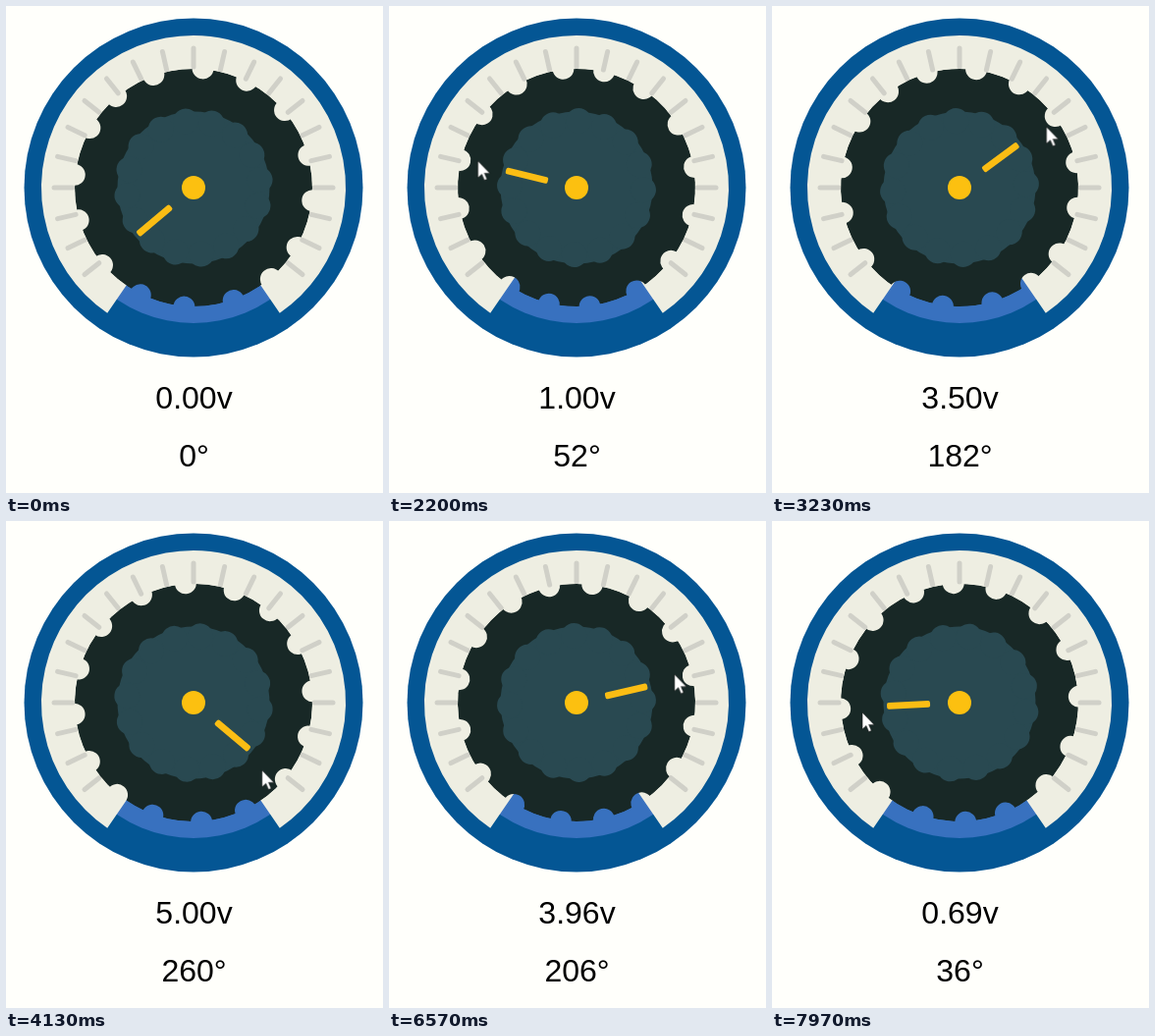
Animation, 384 px wide and 496 px high, one loop 8000 ms. Source, as an HTML page without scripts:

```html
<!DOCTYPE html>
<html lang="en">
<head>
<meta charset="utf-8">
<title>Potentiometer dial</title>
<style>
@property --turn { syntax: "<number>"; inherits: true; initial-value: 0; }
@property --deg { syntax: "<integer>"; inherits: true; initial-value: 0; }
@property --cents { syntax: "<integer>"; inherits: true; initial-value: 0; }
@property --volts { syntax: "<integer>"; inherits: true; initial-value: 0; }

html, body {
  margin: 0;
  width: 384px;
  height: 496px;
  overflow: hidden;
  background: #fffffb;
}
body {
  position: relative;
  animation: turn 8s linear infinite;
  /* the readout trails the knob slightly between its end stops */
  --deg: calc(var(--turn) - min(1.5, var(--turn) * .1, (260 - var(--turn)) * .1));
  --cents: calc(var(--deg) * 100 / 52);
  --volts: calc(var(--cents) / 100 - .495);
}
svg { display: block; }

.knob { transform: rotate(calc(var(--turn) * 1deg)); }
.cursor { animation: drag 8s linear infinite, appear 8s step-end infinite; }

p {
  position: absolute;
  left: 0;
  width: 383px;
  margin: 0;
  text-align: center;
  font: 32px/32px "Liberation Sans", Arial, sans-serif;
  color: #000;
}
.volts { top: 383px; counter-reset: v var(--volts) c calc(var(--cents) - 100 * var(--volts)); }
.volts::before { content: counter(v) "." counter(c, decimal-leading-zero); }
.angle { top: 442px; counter-reset: d var(--deg); }
.angle::before { content: counter(d); }

@keyframes turn {
  0%, 16.6% { --turn: 0; }
  18.75% { --turn: 4; }
  21.25% { --turn: 14; }
  24.4% { --turn: 31; }
  27.5% { --turn: 53.5; }
  33.75% { --turn: 117; }
  40.38% { --turn: 183.5; }
  45.6% { --turn: 230; }
  50.6%, 76.6% { --turn: 260; }
  80% { --turn: 235; }
  83.75% { --turn: 186; }
  89.13% { --turn: 115.4; }
  94.38% { --turn: 74; }
  99.6% { --turn: 37.5; }
  100% { --turn: 36; }
}
@keyframes drag {
  0%, 9.63% { transform: rotate(-126.4deg) translateY(-104px) rotate(126.4deg); }
  10%, 16.6% { transform: rotate(-128deg) translateY(-104px) rotate(128deg); }
  18.75% { transform: rotate(-124.5deg) translateY(-104px) rotate(124.5deg); }
  21.25% { transform: rotate(-114.5deg) translateY(-104px) rotate(114.5deg); }
  24.4% { transform: rotate(-97.5deg) translateY(-104px) rotate(97.5deg); }
  27.5% { transform: rotate(-75deg) translateY(-104px) rotate(75deg); }
  33.75% { transform: rotate(-11.5deg) translateY(-106px) rotate(11.5deg); }
  40.38% { transform: rotate(55deg) translateY(-108px) rotate(-55deg); }
  45.6% { transform: rotate(101.5deg) translateY(-102px) rotate(-101.5deg); }
  51.63% { transform: rotate(134.6deg) translateY(-98px) rotate(-134.6deg); }
  53.75%, 55.5% { transform: rotate(137deg) translateY(-100px) rotate(-137deg); }
  59.63%, 64.6% { transform: rotate(111.7deg) translateY(-100px) rotate(-111.7deg); }
  69.63%, 71.25% { transform: rotate(130deg) translateY(-98px) rotate(-130deg); }
  72.1%, 76.6% { transform: rotate(128.7deg) translateY(-97.5px) rotate(-128.7deg); }
  80% { transform: rotate(102deg) translateY(-101px) rotate(-102deg); }
  83.75% { transform: rotate(52.7deg) translateY(-106px) rotate(-52.7deg); }
  89.13% { transform: rotate(-18deg) translateY(-112.6px) rotate(18deg); }
  94.38% { transform: rotate(-59.4deg) translateY(-106px) rotate(59.4deg); }
  99.6%, 100% { transform: rotate(-95.8deg) translateY(-99.5px) rotate(95.8deg); }
}
@keyframes appear {
  0% { visibility: hidden; }
  9.62%, 100% { visibility: visible; }
}
</style>
</head>
<body>
<svg width="384" height="496" viewBox="0 0 384 496">
  <defs>
    <g id="ticks" stroke="#d0d0c8" stroke-width="5" stroke-linecap="round">
      <path id="tick" d="M0-142V-123"/>
      <use href="#tick" transform="rotate(12.857)"/>
      <use href="#tick" transform="rotate(-12.857)"/>
    </g>
    <mask id="notches" maskUnits="userSpaceOnUse" x="-140" y="-140" width="280" height="280">
      <circle r="121" fill="#fff"/>
      <circle r="122" pathLength="360" transform="rotate(-85.5)" fill="none" stroke="#000"
        stroke-width="22" stroke-linecap="round"
        stroke-dasharray="0 21.9 0 23.3 0 24.5 0 22 0 23.8 0 19.7 0 20.8 0 24"/>
    </mask>
  </defs>
  <g transform="translate(191 185)">
    <circle r="172.5" fill="#045694"/>
    <circle r="138" fill="#3871bf"/>
    <!-- scale, open 69 degrees at the bottom -->
    <circle r="130" pathLength="360" transform="rotate(124.5)" fill="none" stroke="#eeeee2"
      stroke-width="50" stroke-dasharray="291 69"/>
    <use href="#ticks"/>
    <use href="#ticks" transform="rotate(38.571)"/>
    <use href="#ticks" transform="rotate(77.143)"/>
    <use href="#ticks" transform="rotate(115.714)"/>
    <use href="#ticks" transform="rotate(-38.571)"/>
    <use href="#ticks" transform="rotate(-77.143)"/>
    <use href="#ticks" transform="rotate(-115.714)"/>
    <g class="knob">
      <circle r="121" fill="#182826" mask="url(#notches)"/>
      <g fill="#294951" stroke="#294951">
        <circle r="77.5" stroke="none"/>
        <circle r="68" pathLength="360" transform="rotate(-74.25)" fill="none"
          stroke-width="26" stroke-linecap="round" stroke-dasharray="0 22.5"/>
      </g>
      <rect x="-3.4" y="-74" width="6.8" height="44" rx="2" fill="#fbbd14" transform="rotate(-130)"/>
    </g>
    <circle r="12" fill="#fcc010"/>
    <path class="cursor" d="M0 0V17L3.9 13.4L6.6 19.6L9.2 18.5L6.6 12.4H12Z"
      fill="#fff" stroke="#111" stroke-width=".5"/>
  </g>
</svg>
<p class="volts">v</p>
<p class="angle">°</p>
</body>
</html>
```
